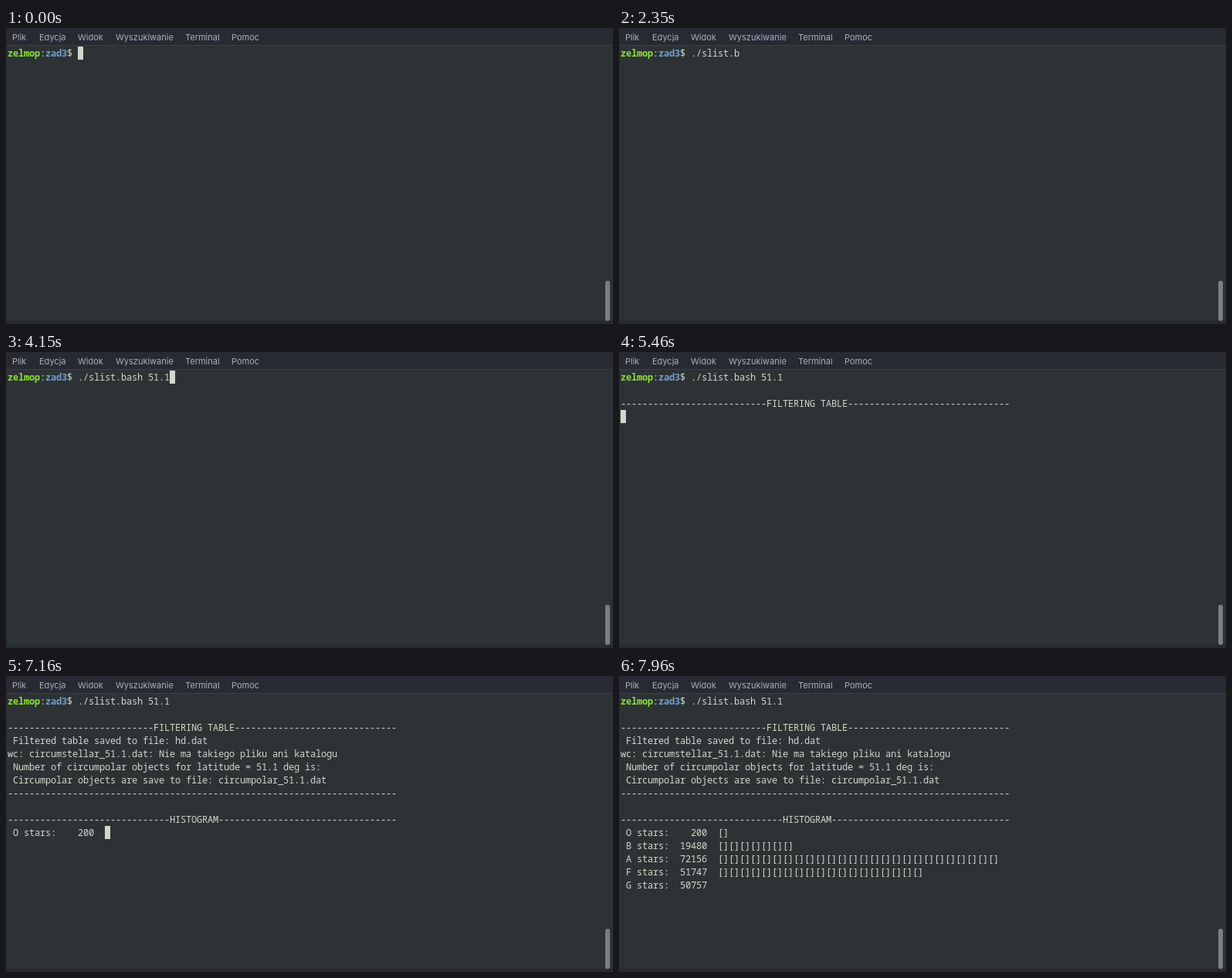
An HTML page with a canvas for the animation above (8 s loop, 786 px wide and 383 px high).

```html
<!DOCTYPE html>
<html lang="pl">
<head>
<meta charset="utf-8">
<title>Terminal</title>
<style>
  html, body { margin: 0; width: 100%; height: 100%; overflow: hidden; background: #2d3234; }
  canvas { display: block; }
</style>
</head>
<body>
<canvas id="stage" width="786" height="383"></canvas>
<script>
const ctx = document.getElementById('stage').getContext('2d');
const LOOP = 8000;
const CELL_W = 7, CELL_H = 17, LEFT = 2, TOP = 24, BASELINE = 13;
const MONO = '12px "Noto Sans Mono", monospace';
const MENU = [['Plik', 8], ['Edycja', 43], ['Widok', 93], ['Wyszukiwanie', 142], ['Terminal', 232], ['Pomoc', 292]];
const COLORS = {
  back: '#2d3234', frame: '#282a33', edge: '#3d4145', menu: '#a9afba',
  text: '#d3d7cf', user: '#8ae234', folder: '#729fcf', thumb: '#7b7f84'
};
const USER = 'zelmop', FOLDER = 'zad3';
const PROMPT = `${USER}:${FOLDER}$ `;

const dashes = n => '-'.repeat(n);
const count = (type, n) => ` ${type} stars:${String(n).padStart(7)}  `;
const bar = n => '[]'.repeat(Math.ceil(n / 2800)) + '\n';

// Everything the terminal receives: [time in ms, text]
const output = [[0, PROMPT]];
const command = './slist.bash 51.1';
const keyTimes = [1160, 1240, 1410, 1530, 1710, 1810, 2030, 2180, 2350, 2440, 2610, 2740, 2900, 3510, 3690, 3920, 4150];
keyTimes.forEach((time, i) => output.push([time, command[i]]));
output.push(
  [5360, '\n'],
  [5460, `\n${dashes(27)}FILTERING TABLE${dashes(30)}\n`],
  [6820, ' Filtered table saved to file: hd.dat\n'],
  [7080, 'wc: circumstellar_51.1.dat: Nie ma takiego pliku ani katalogu\n' +
         ' Number of circumpolar objects for latitude = 51.1 deg is:\n' +
         ' Circumpolar objects are save to file: circumpolar_51.1.dat\n' +
         `${dashes(72)}\n\n${dashes(30)}HISTOGRAM${dashes(33)}\n`]
);
[['O', 200], ['B', 19480], ['A', 72156], ['F', 51747], ['G', 50757]].forEach(([type, n], i) => {
  output.push([7160 + i * 200, count(type, n)], [7260 + i * 200, bar(n)]);
});

const cursorVisible = t => t < 2180 || (t >= 4150 && t < 7560);

function rect(color, x, y, w, h) {
  ctx.fillStyle = color;
  ctx.fillRect(x, y, w, h);
}

function drawCells(text, col, row, color, bold = false) {
  ctx.font = (bold ? 'bold ' : '') + MONO;
  ctx.fillStyle = color;
  [...text].forEach((char, i) =>
    ctx.fillText(char, LEFT + (col + i) * CELL_W, TOP + row * CELL_H + BASELINE));
}

function drawWindow() {
  rect(COLORS.back, 0, 0, 786, 383);
  rect(COLORS.frame, 0, 0, 786, 22);
  rect(COLORS.edge, 0, 22, 786, 1);
  rect(COLORS.frame, 0, 23, 1, 360);
  rect(COLORS.frame, 0, 379, 786, 4);
  ctx.font = '11px Inter, sans-serif';
  ctx.fillStyle = COLORS.menu;
  MENU.forEach(([label, x]) => ctx.fillText(label, x, 16));
  ctx.fillStyle = COLORS.thumb;
  ctx.beginPath();
  ctx.roundRect(776, 327, 6, 52, 3);
  ctx.fill();
}

function draw(t) {
  drawWindow();
  const lines = output.filter(([time]) => time <= t).map(([, text]) => text).join('').split('\n');
  lines.forEach((line, row) => {
    if (row > 0) return drawCells(line, 0, row, COLORS.text);
    const folderCol = USER.length + 1, restCol = folderCol + FOLDER.length;
    drawCells(USER, 0, 0, COLORS.user, true);
    drawCells(':', USER.length, 0, COLORS.text);
    drawCells(FOLDER, folderCol, 0, COLORS.folder, true);
    drawCells(line.slice(restCol), restCol, 0, COLORS.text);
  });
  if (cursorVisible(t)) {
    const row = lines.length - 1;
    rect(COLORS.text, LEFT + lines[row].length * CELL_W, TOP + row * CELL_H, CELL_W, CELL_H);
  }
}

const start = performance.now();
function tick() {
  draw((performance.now() - start) % LOOP);
  requestAnimationFrame(tick);
}
tick();
</script>
</body>
</html>
```
